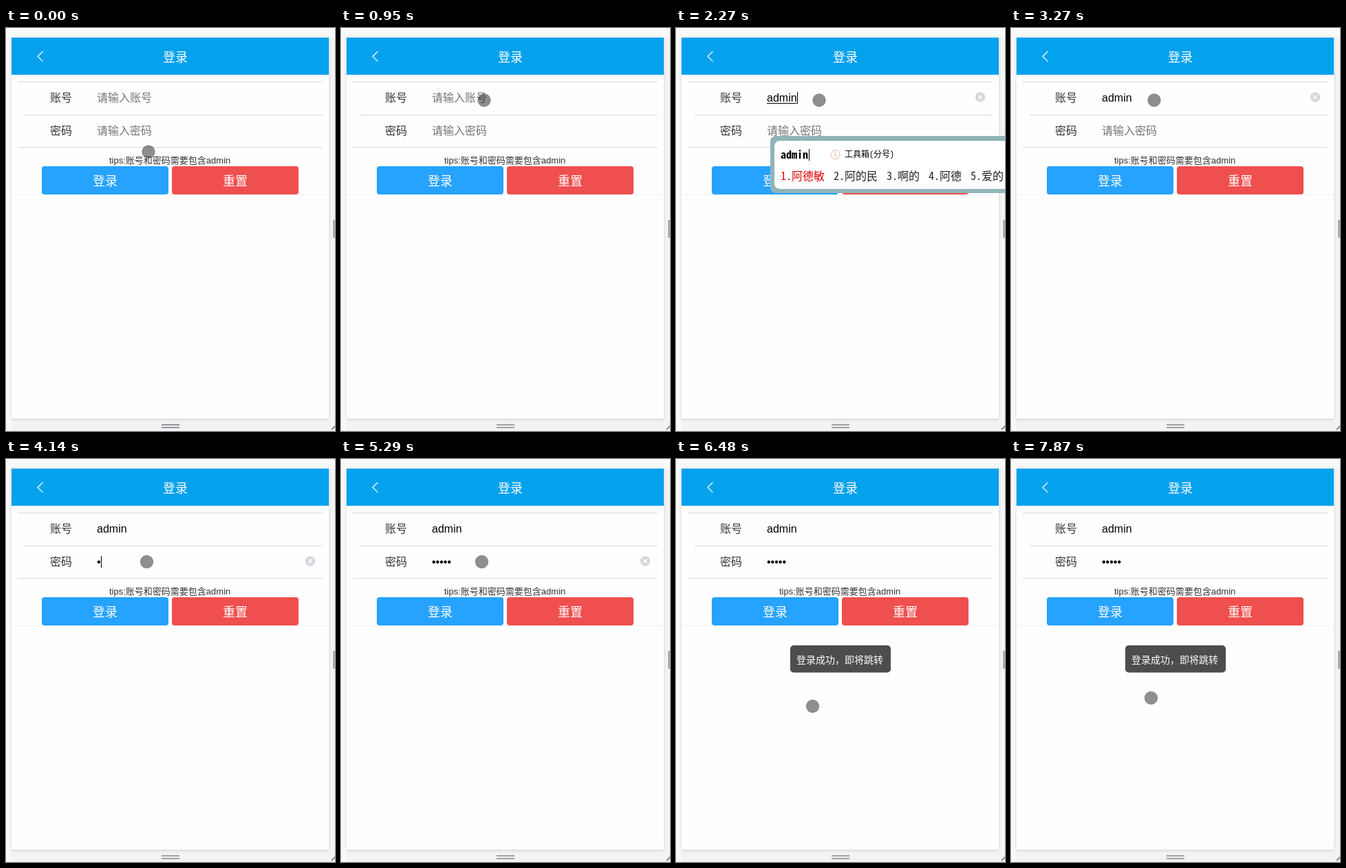
An HTML page that plays this animation: 478 px wide and 586 px high, repeating every 8000 ms.

```html
<!DOCTYPE html>
<html lang="zh">
<head>
<meta charset="utf-8">
<title>登录</title>
<style>
  html, body { margin: 0; width: 100%; height: 100%; overflow: hidden; background: #f9f9f9; }
  svg { display: block; width: 478px; height: 586px; }
  text { font: 16px "Liberation Sans", "Noto Sans CJK SC", "Noto Sans CJK", sans-serif; white-space: pre; }
  .label { fill: #333; }
  .hint { fill: #757575; }
  .big { font-size: 18px; fill: #fff; text-anchor: middle; }
  .line { fill: #d9d9d9; }
  .ime text { font-family: "Noto Sans Mono CJK SC", "Noto Sans CJK SC", "Noto Sans CJK", monospace; fill: #222; }
  .ime .code { font-weight: bold; fill: #000; }
  .ime .tool { font-size: 12px; fill: #000; }
  .ime .first { fill: #e60000; }
</style>
</head>
<body>
<svg viewBox="0 0 478 586">
  <defs>
    <g id="clear">
      <circle r="7.2" fill="#d4d7dd"/>
      <path d="M-2.7-2.7 2.7 2.7M2.7-2.7-2.7 2.7" stroke="#fff" stroke-width="1.3"/>
    </g>
    <linearGradient id="sky" x2="0.3" y2="1">
      <stop offset="0" stop-color="#d9c9c4"/>
      <stop offset=".45" stop-color="#efe3cf"/>
      <stop offset=".75" stop-color="#b9c8d8"/>
      <stop offset="1" stop-color="#e6d6cf"/>
    </linearGradient>
    <filter id="soft" x="-10%" y="-10%" width="120%" height="120%"><feGaussianBlur stdDeviation="2.5"/></filter>
  </defs>

  <!-- device frame -->
  <rect width="478" height="586" fill="#f9f9f9"/>
  <rect x="469" y="14" width="9" height="572" fill="#f3f3f3"/>
  <rect x="8" y="569" width="470" height="17" fill="#f3f3f3"/>
  <rect x="8" y="14" width="461" height="555" filter="url(#soft)" opacity=".14"/>
  <rect x="8" y="14" width="461" height="555" fill="#dedede"/>
  <rect x="8" y="14" width="461" height="554" fill="#fefefe"/>
  <path d="M476.5 279v26" stroke="#8c8c8c" stroke-width="2"/>
  <path id="grip" d="M226 577h26M226 581h26" stroke-width="2"/>
  <path d="M473 584l6-6" stroke="#8c8c8c" stroke-width="2"/>

  <!-- header -->
  <rect x="8" y="14" width="461" height="54" fill="#04a1ed"/>
  <path d="M53.5 34 46 41.3 53.5 48.6" fill="none" stroke="#fff" stroke-width="1.2"/>
  <text class="big" x="246" y="49">登录</text>

  <!-- form -->
  <rect class="line" x="17" y="78" width="443" height="1"/>
  <rect class="line" x="27" y="126" width="433" height="1"/>
  <rect class="line" x="17" y="173" width="443" height="1"/>
  <rect x="8" y="242" width="461" height="1" fill="#f0f0f0"/>
  <text class="label" x="64" y="107">账号</text>
  <text class="label" x="64" y="155">密码</text>
  <text class="hint" x="132" y="107" data-show="0-1170">请输入账号</text>
  <text class="hint" x="132" y="155" data-show="0-4060">请输入密码</text>
  <text id="account" x="132" y="107"></text>
  <text id="secret" x="132" y="155"></text>
  <rect id="underline" x="132" y="109" height="1" data-show="1170-2680"/>
  <rect id="caret1" y="93" width="1" height="17" data-show="500-950 1170-3270"/>
  <rect id="caret2" y="141" width="1" height="17" data-show="3740-5290 5790-6150"/>
  <use href="#clear" x="442" y="100.5" data-show="1170-3670"/>
  <use href="#clear" x="442" y="148.5" data-show="4060-6150"/>
  <text class="label" x="150" y="197" style="font-size:13px">tips:账号和密码需要包含admin</text>
  <rect x="52" y="201" width="184" height="41" rx="4" fill="#26a2ff"/>
  <text class="big" x="144" y="229">登录</text>
  <rect x="52" y="201" width="184" height="41" rx="4" opacity=".4" data-show="6150-6360"/>
  <rect x="241" y="201" width="184" height="41" rx="4" fill="#ef4f4f"/>
  <text class="big" x="333" y="229">重置</text>

  <!-- input method window -->
  <g id="ime" class="ime">
    <rect id="panel" x="137" y="157" height="83" rx="8" fill="#8fb5b9"/>
    <rect id="paper" x="143" y="164" height="70" rx="8" fill="#fff"/>
    <text id="code" class="code" x="152" y="190"></text>
    <rect id="caret3" y="176" width="1" height="17"/>
    <g fill="none" stroke="#f3b3a0">
      <circle cx="231.5" cy="184" r="6.5"/>
      <path d="M231.5 183v4.500M231.500 180v1.500" stroke-width="1.500"/>
    </g>
    <text class="tool" x="245" y="188">工具箱(分号)</text>
    <text id="words" y="221"></text>
    <g id="tail">
      <path d="M383 210v11l-6-5.500z" fill="#aab0b8"/>
      <path d="M389 210v11l6-5.500z"/>
      <rect x="401.500" y="208.500" width="14" height="14" fill="#f6f3ee" stroke="#8e8e8e"/>
      <path d="M404.500 214h8l-4 4z" fill="#5a4038"/>
      <rect x="421" y="157" width="90" height="83" fill="url(#sky)"/>
      <path d="M421 157H478V181L458 178 446 200 432 190 421 192z" fill="#9b6a70"/>
      <path d="M421 240C428 218 452 208 474 220L460 226 468 240z" fill="#6d3f7d"/>
      <path d="M478 126 468 142 472 157H478z" fill="#c3d6e0"/>
    </g>
  </g>

  <!-- toast -->
  <g id="toast">
    <rect x="166" y="271" width="146" height="39.500" rx="5" fill="#4d4d4d"/>
    <text x="175" y="297" fill="#fff" style="font-size:14px">登录成功，即将跳转</text>
  </g>

  <g id="cursor">
    <circle id="dot" fill="#000"/>
    <circle id="ring" fill="none"/>
  </g>
</svg>
<script>
const LOOP = 8000;
const $ = id => document.getElementById(id);
const set = (el, attrs) => { for (const k in attrs) el.setAttribute(k, attrs[k]); };

const accountKeys = [1170, 1680, 1960, 2120, 2270];
const secretKeys = [4060, 4290, 4440, 4600, 4750];
const candidates = [
  "啊 阿 吖 嘎 锕",
  "阿德 啊 阿 吖 锕",
  "阿德们 阿的吗 啊的 阿德 爱的",
  "阿德米 阿的米 啊的 阿德 爱的",
  "阿德敏 阿的民 啊的 阿德 爱的"
].map(s => s.split(" "));

// Stepped values: [time, value]
const imeFade = [[0, 0], [1170, .6], [1220, 1], [2680, .6], [2750, .25], [2820, 0]];
const toastFade = [[0, 0], [6250, .22], [6360, .7], [6480, 1]];

// Pointer moves: start, end, steps, target, optional Bezier handles
const home = [207, 180];
const moves = [
  [70, 250, 4, [208, 105]],
  [3350, 3510, 3, [204.5, 149.5]],
  [5530, 6000, 7, [175.5, 233]],
  [6360, 6360, 1, [186, 290]],
  [6480, 6480, 1, [198.5, 359.5]],
  [6570, 6570, 1, [198.5, 355]],
  [6850, 7630, 11, [220, 356], [62, -9], [435, -9]],
  [7730, 7870, 3, [203.5, 347.5]]
];

const timed = [...document.querySelectorAll("[data-show]")].map(el => ({
  el, spans: el.dataset.show.split(" ").map(s => s.split("-").map(Number))
}));

const count = (keys, t) => keys.filter(k => k <= t).length;
const held = (track, t) => track.filter(([at]) => at <= t).pop()[1];
const bezier = (a, b, c, d, u) => {
  const v = 1 - u;
  return v * v * v * a + 3 * v * v * u * b + 3 * v * u * u * c + u * u * u * d;
};

function pointer(t) {
  let from = home;
  for (const [start, end, steps, to, h1, h2] of moves) {
    if (t < start) break;
    if (t >= end) { from = to; continue; }
    const step = Math.floor((t - start) / (end - start) * (steps - 1) + 1e-6);
    const u = (step + 1) / steps;
    return [0, 1].map(i => h1
      ? bezier(from[i], h1[i], h2[i], to[i], u)
      : from[i] + (to[i] - from[i]) * u);
  }
  return from;
}

function drawIme(typed) {
  const code = $("code"), words = $("words");
  code.textContent = typed;
  set($("caret3"), { x: Math.round(152 + code.getComputedTextLength()) + 1 });
  let x = 152;
  words.textContent = "";
  candidates[typed.length - 1].forEach((word, i) => {
    const span = document.createElementNS(words.namespaceURI, "tspan");
    set(span, { x, class: i ? "" : "first" });
    span.textContent = `${i + 1}.${word}`;
    if (!i) span.style.fill = "#e60000";
    words.append(span);
    x += 16 + 16 * word.length + 13;
  });
  const shift = x - 377;
  set($("tail"), { transform: `translate(${shift} 0)` });
  set($("panel"), { width: 290 + shift });
  set($("paper"), { width: 278 + shift });
}

let shown = -1;
function typeAccount(n) {
  if (n === shown) return;
  shown = n;
  const typed = "admin".slice(0, n);
  $("account").textContent = typed;
  const width = n ? $("account").getComputedTextLength() : 0;
  set($("caret1"), { x: Math.round(132 + width) });
  set($("underline"), { width });
  if (n) drawIme(typed);
}

function render(t) {
  for (const { el, spans } of timed)
    el.style.visibility = spans.some(([a, b]) => t >= a && t < b) ? "visible" : "hidden";

  typeAccount(count(accountKeys, t));
  const dots = count(secretKeys, t);
  $("secret").textContent = "•".repeat(dots);
  set($("caret2"), { x: Math.round(132 + dots * 5.6) });

  set($("ime"), { opacity: held(imeFade, t) });
  set($("toast"), { opacity: held(toastFade, t) });
  set($("grip"), { stroke: t < 130 ? "#90959b" : "#a2a2a2" });

  const pressed = t >= 6150 && t < 6360;
  set($("cursor"), { transform: `translate(${pointer(t)})` });
  set($("dot"), { r: pressed ? 10.5 : 9.5, opacity: pressed ? .5 : .44 });
  set($("ring"), pressed
    ? { r: 10.3, stroke: "#86a8c0", "stroke-width": 1.5 }
    : { r: 9, stroke: "#888", "stroke-width": 1 });
}

const start = performance.now();
function tick(now) {
  render(Math.max(0, now - start) % LOOP);
  requestAnimationFrame(tick);
}
render(0);
requestAnimationFrame(tick);
</script>
</body>
</html>
```
